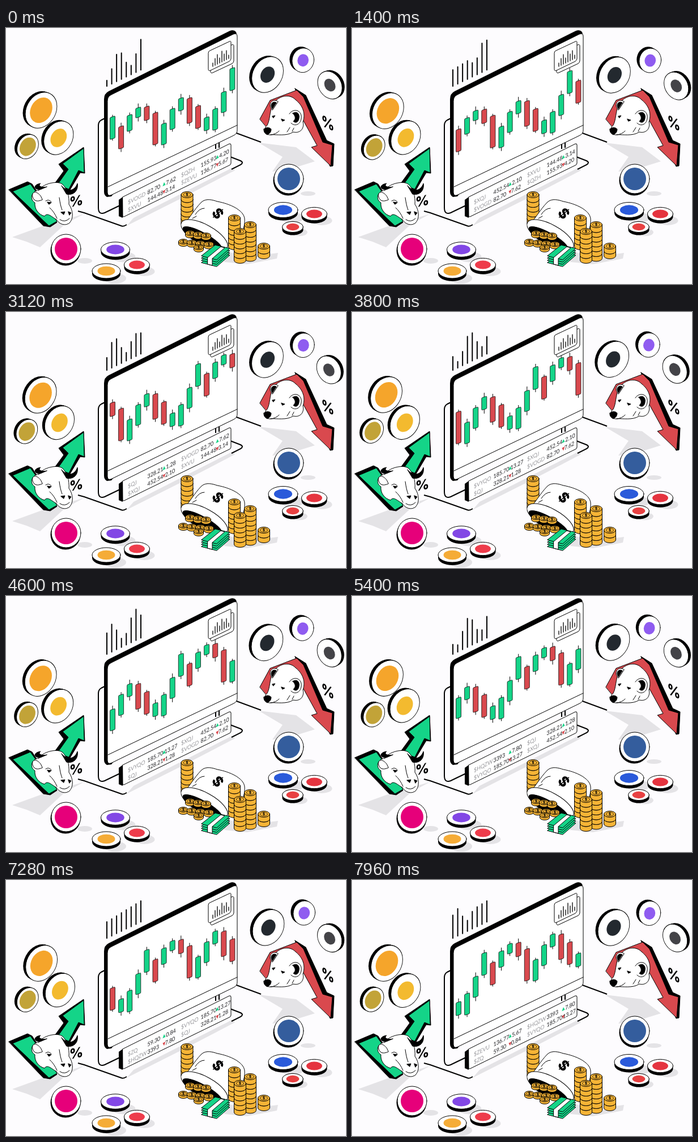
Recreate the animation shown at these times as an HTML page. Size 600 by 453 pixels, loop 8000 ms.

```html
<!DOCTYPE html>
<html lang="en">
<head>
<meta charset="utf-8">
<title>Markets</title>
<style>
html, body { margin: 0; width: 100%; height: 100%; overflow: hidden; background: #fdfcfe; }
svg { display: block; width: 600px; height: 453px; font-family: Lato, sans-serif; }
.ink { fill: none; stroke: #000; stroke-width: 2; }
.line { stroke: #000; stroke-width: 1; stroke-linejoin: round; stroke-linecap: round; }
.thin { stroke: #000; stroke-width: .7; }
.none { fill: none; }
.white { fill: #fff; }
.green { fill: #14d488; }
.red { fill: #d9494e; }
.gold { fill: #f6b436; }
.shade { fill: #e4e3e6; }
.bold { font-family: Inter, sans-serif; font-weight: 800; text-anchor: middle; }
</style>
</head>
<body>
<svg viewBox="0 0 600 453">
  <g class="shade">
    <path d="M11 370 L66 350 L138 329 L104 347 L60 388 L36 378Z"/>
    <path d="M446 203 L512 211 L545 236 L500 250 L470 254 L488 228Z"/>
    <path d="M213 350 L225 336 L398 248 L404 252 L310 301Z"/>
    <path d="M385 394 L424 405 L480 398 L478 408 L425 418 L385 414Z"/>
    <ellipse cx="139" cy="412" rx="13" ry="5"/>
    <ellipse cx="533" cy="293" rx="13" ry="4"/>
  </g>

  <!-- cables and rear frame -->
  <g class="ink">
    <path d="M127 324 L138 327 L203 350 Q207 352 213 348"/>
    <path d="M404 185 L450 202"/>
    <path d="M396 228 L414 235 Q420 238 414 242 L398 250"/>
    <path d="M174 160 L168 163 Q163 166 163 172 V318 Q163 331 174 327 L203 313"/>
    <path d="M370 205 V214 M376 202 V212"/>
  </g>

  <!-- monitor -->
  <path d="M173 126 Q173 116 181 112 L395 5 Q402 2 406 7 L408 14 L186 298 L178 299 Q173 296 173 290Z"/>
  <path class="line white" d="M179 129 Q179 121 186 118 L401 11 Q408 8 408 15 V181 Q408 187 402 190 L187 295 Q179 299 179 291Z"/>
  <path class="line none" d="M180 281 L408 172"/>
  <g class="line white">
    <path d="M361 48 L398 30 Q402 28 402 32 V58 Q402 61 399 63 L365 79 Q361 81 361 77Z"/>
    <path d="M357 44 Q357 41 360 40 L394 24 Q397 22 397 26 V54 Q397 57 394 59 L361 75 Q357 77 357 73Z"/>
    <path stroke-width="1.3" d="M365 68 V62 M369 66 V54 M373 64 V47 M377 62 V53 M381 60 V41 M385 58 V46 M389 56 V40 M393 54 V48"/>
  </g>

  <!-- ticker board -->
  <path d="M199 304 L206 299 V336 L199 333Z"/>
  <path class="line white" d="M206 299 L394 205 Q397 204 397 207 V239 Q397 242 394 243 L208 334 Q206 335 206 332Z"/>

  <!-- rising arrow and bull -->
  <g class="line">
    <path d="M5 286 L38 272 L46 276 L90 344 L78 352 L66 350Z"/>
    <path class="green" d="M12 289 L43 276 L90 342 L76 350Z"/>
    <path d="M86 275 L102 253 L93 241 L137 211 L139 257 L131 256 L112 288Z"/>
    <path class="green" d="M91 277 L110 250 L100 240 L137 213 L138 256 L128 252 L111 285Z"/>
    <path class="white" d="M58 287 C65 275 90 270 99 276 C108 284 112 298 111 312 C118 322 120 336 112 345 C104 351 94 347 89 339 C79 333 73 326 68 333 C57 330 50 320 51 309 C42 304 43 289 58 287Z"/>
    <path class="white" d="M61 297 C53 287 45 289 47 299 C50 308 57 307 64 304Z"/>
    <path d="M60 286 C48 286 48 277 61 275 C55 280 64 283 72 281Z"/>
    <path d="M98 279 C108 291 121 289 126 275 C128 286 121 297 107 294Z"/>
    <path class="none" d="M70 306 Q76 302 80 308 M77 318 Q85 325 90 337 M94 300 Q96 315 99 322"/>
    <path d="M73 308 L80 309 L76 312Z M97 326 L104 325 L102 330Z M110 325 L115 327 L112 331Z"/>
    <path class="none" d="M95 339 Q104 345 112 337"/>
  </g>
  <text class="bold" font-size="25" transform="matrix(.95 -.2 0 1 124 315)">%</text>

  <!-- falling arrow and bear -->
  <g class="line">
    <path d="M510 107 L529 119 L566 199 L579 205 L577 244 L572 245 L551 200Z"/>
    <path class="red" d="M448 161 L466 128 L513 110 L525 122 L559 202 L576 207 L573 244 L539 211 L549 208 L521 157 L463 179Z"/>
    <path class="white" d="M470 137 C478 120 500 115 511 127 C524 137 529 152 524 166 C527 178 519 187 507 184 C495 192 478 188 467 189 C456 190 453 179 461 172 C466 163 465 149 470 137Z"/>
    <path class="white" d="M470 145 C461 136 469 123 480 130 Z"/>
    <path d="M470 143 C465 136 470 128 477 132 Z"/>
    <path class="white" d="M500 152 C507 141 523 145 521 160 C520 171 509 175 503 168"/>
    <path d="M506 151 C513 146 519 152 517 160 C516 167 511 169 507 165 C512 161 511 156 506 151Z"/>
    <path d="M455 179 Q462 173 468 179 Q468 186 461 189 Q454 185 455 179Z M486 161 L492 163 L488 165Z M470 156 L475 155 L472 159Z"/>
    <path class="none" d="M467 189 Q477 188 482 182 M501 176 L496 184 M508 177 L505 183"/>
  </g>
  <text class="bold" font-size="27" transform="matrix(.82 .36 0 1 568 178)">%</text>

  <g id="props"></g>
  <g id="live"></g>
</svg>
<script>
const LOOP = 8000, WAVE = 5120, CANDLE_STEP = 720, TICKER_STEP = 1280, VISIBLE = 15;
const TAU = 2 * Math.PI;
const $ = id => document.getElementById(id);
const range = (n, fn) => Array.from({ length: n }, (_, i) => fn(i)).join('');
const ellipse = (x, y, rx, ry, attrs = '') =>
  `<ellipse cx="${x}" cy="${y}" rx="${rx}" ry="${ry}" ${attrs}/>`;

// ---- static props ----
const flatCoin = (x, y, rx, color) => {
  const ry = rx * .52;
  return ellipse(x + rx * .6, y + ry, rx * .8, ry * .7, 'class="shade"') +
    `<path d="M${x - rx} ${y}v5a${rx} ${ry} 0 0 0 ${2 * rx} 0v-5Z"/>` +
    ellipse(x, y, rx, ry, 'class="line white"') +
    ellipse(x, y, rx * .62, ry * .64, `fill="${color}"`);
};

const roundCoin = (x, y, color) =>
  ellipse(x - 1, y + 3, 26.5, 26.5) + ellipse(x, y, 26, 26, 'class="line white"') +
  ellipse(x, y, 20, 20, `fill="${color}"`);

const goldCoin = (x, y, rx = 10.5, h = 8.5) => {
  const ry = rx * .52;
  return `<path class="line gold" d="M${x - rx} ${y}v${h}a${rx} ${ry} 0 0 0 ${2 * rx} 0v-${h}Z"/>` +
    ellipse(x, y, rx, ry, 'class="line gold"') +
    ellipse(x, y, rx * .62, ry * .62, 'class="thin none"') +
    `<text class="bold" x="${x}" y="${y + 2.3}" font-size="6">$</text>`;
};

const stack = (x, top, count) => range(count, i => goldCoin(x, top + (count - 1 - i) * 8.5));

const bag = `<g class="line">
  <path class="white" d="M310 350 C320 344 331 322 345 308 C353 301 364 304 373 307 C395 311 419 322 421 337 C423 359 407 388 385 395Z"/>
  <g transform="rotate(29 349 368)">${ellipse(349, 366, 46, 18, 'class="white"')}${ellipse(349, 373, 39, 10)}</g>
  <path class="none" d="M334 330 Q341 319 350 319 M329 337 L336 333"/></g>
  <text class="bold" font-size="25" transform="translate(374 328) rotate(50)" y="9">$</text>`;

const spill =
  range(3, i => goldCoin(325 + 14 * i, 363 + 2 * i, 8.5, 4)) +
  range(4, i => goldCoin(313 + 15 * i, 378 + 1.5 * i, 8.5, 4)) + goldCoin(340, 388, 8.5, 4);

const cash = range(4, i =>
  `<path class="line green" d="M345 ${415 - 4 * i}l24 -19l26 6l-23 20Z"/>`) +
  '<path class="line white" d="M356 406L379 387L386 389L364 408V420L356 418Z"/>';

$('props').innerHTML =
  stack(319.5, 295, 6) + bag + spill + cash +
  stack(403, 336, 6) + stack(431, 348, 7) + stack(413, 360, 6) + stack(455, 386, 2) +
  roundCoin(499, 267, '#345d9d') + roundCoin(106, 391, '#e6007a') +
  flatCoin(193, 392, 25.5, '#8247e5') + flatCoin(177, 430, 25, '#f5ac37') +
  flatCoin(231, 419, 22.5, '#ee3c4b') + flatCoin(489, 322, 26, '#2a5ada') +
  flatCoin(544, 329, 22.5, '#e5343f') + flatCoin(506, 352, 18.5, '#e84142');

// ---- floating coins ----
const coins = [
  { x: 62, y: 146.5, r: 31, tilt: -.22, color: '#f5a52b', mark: 22, phase: 0 },
  { x: 38, y: 211, r: 21, tilt: -.22, color: '#c2a338', mark: 16, phase: .3 },
  { x: 94, y: 195, r: 29, tilt: -.22, color: '#f3ba2f', mark: 16, phase: -1 },
  { x: 462, y: 83.5, r: 31, tilt: -.22, color: '#23292f', mark: 14, phase: -.3 },
  { x: 525, y: 58, r: 21.5, tilt: -.05, color: '#8f5cf0', mark: 11, phase: -.6 },
  { x: 571, y: 102, r: 24, tilt: .22, color: '#444448', mark: 11, phase: .4 },
];
function floatingCoin({ x, y, r, tilt, color, mark, phase }, t) {
  const angle = t / WAVE * TAU + phase;
  const side = Math.sign(tilt);
  return `<g transform="matrix(.9 ${tilt} 0 1 ${x + 1.4 * Math.sin(angle)} ${y - Math.cos(angle)})">` +
    range(5, i => ellipse(side * (5 - i), (i - 5) * .6, r, r)) +
    ellipse(0, 0, r, r, 'class="line white"') + ellipse(0, 0, mark, mark, `fill="${color}"`) + '</g>';
}

// ---- candles: one climbing cycle of [open, close] heights, repeated; the strip jumps by one per step ----
const cycle = [
  [196, 157], [174, 213], [182, 154], [158, 141], [139, 163], [150, 206], [206, 169],
  [179, 143], [146, 124], [124, 168], [138, 177], [181, 158], [180, 143], [149, 113],
];
function drawCandles(t) {
  const step = Math.floor((t + 20) / CANDLE_STEP);
  return range(VISIBLE, slot => {
    const i = step + slot;
    const [open, close] = cycle[i % cycle.length];
    const top = Math.min(open, close), height = Math.abs(open - close);
    const y = top - 86 * Math.floor(i / cycle.length) + 5.27 * step;
    const wick = 3 + i * 3 % 5;
    return `<g transform="translate(${188 + slot * 15.1} ${y}) skewY(-18)">` +
      `<path class="line" d="M0 ${-wick}V${height + wick}"/>` +
      `<rect class="thin ${close > open ? 'red' : 'green'}" x="-4.5" width="9" height="${height}" rx="1.5"/></g>`;
  });
}

// ---- bars: a burst of sine wave that runs along the row, then rests ----
function drawBars(t) {
  const d = range(8, i => {
    const elapsed = (t - 2200 - 140 * i + 2 * WAVE) % WAVE;
    const strength = Math.max(0, Math.min(1, elapsed / 300, (3900 - elapsed) / 300));
    const height = 29 + 1.2 * i + 19 * strength * Math.cos(TAU * ((i - 2.4) / 5 - 3 * t / WAVE));
    return `M${178 + i * 8.57} ${103 - i * 4.1}v${-height}`;
  });
  return `<path class="ink" stroke-linecap="round" d="${d}"/>`;
}

// ---- ticker ----
const quotes = [
  ['$VOGD', '82.70', '7.62'], ['$XQJ', '452.54', '2.10'], ['$QJ', '328.21', '1.28'],
  ['$VYQO', '185.70', '13.27'], ['$HQZW', '3393', '7.80'], ['$ZQ', '59.30', '0.84'],
  ['$ZEVU', '136.77', '5.67'], ['$QZH', '155.93', '4.20'], ['$XVU', '144.48', '3.14'],
];
const word = (s, color, anchor = 'start') =>
  `<text font-size="10.2" fill="${color}" text-anchor="${anchor}">${s}</text>`;

function drawTicker(t) {
  const step = Math.floor((t + 280) / TICKER_STEP);
  return range(4, place => {
    const [name, price, change] = quotes[(step - place + 9) % 9];
    const low = place % 2, left = place > 1 ? 309 : 215;
    const put = (dx, content) => {
      const x = left + dx, y = 312.5 + low * 13.5 - .51 * (x - 215);
      return `<g transform="matrix(.87 -.445 0 1 ${x} ${y})">${content}</g>`;
    };
    return put(0, word(name, '#98989c')) + put(34.5, word(price, '#1d1d20')) +
      put(64, `<path class="${low ? 'red' : 'green'}" d="${low ? 'M-3 -6H3L0 0Z' : 'M-3 -1H3L0 -7Z'}"/>`) +
      put(low ? 74.5 : 76, word(change, '#1d1d20', 'middle'));
  });
}

const start = performance.now();
function frame() {
  const t = (performance.now() - start) % LOOP;
  $('live').innerHTML = drawBars(t) + drawCandles(t) + drawTicker(t) +
    coins.map(coin => floatingCoin(coin, t)).join('');
  requestAnimationFrame(frame);
}
frame();
</script>
</body>
</html>
```
